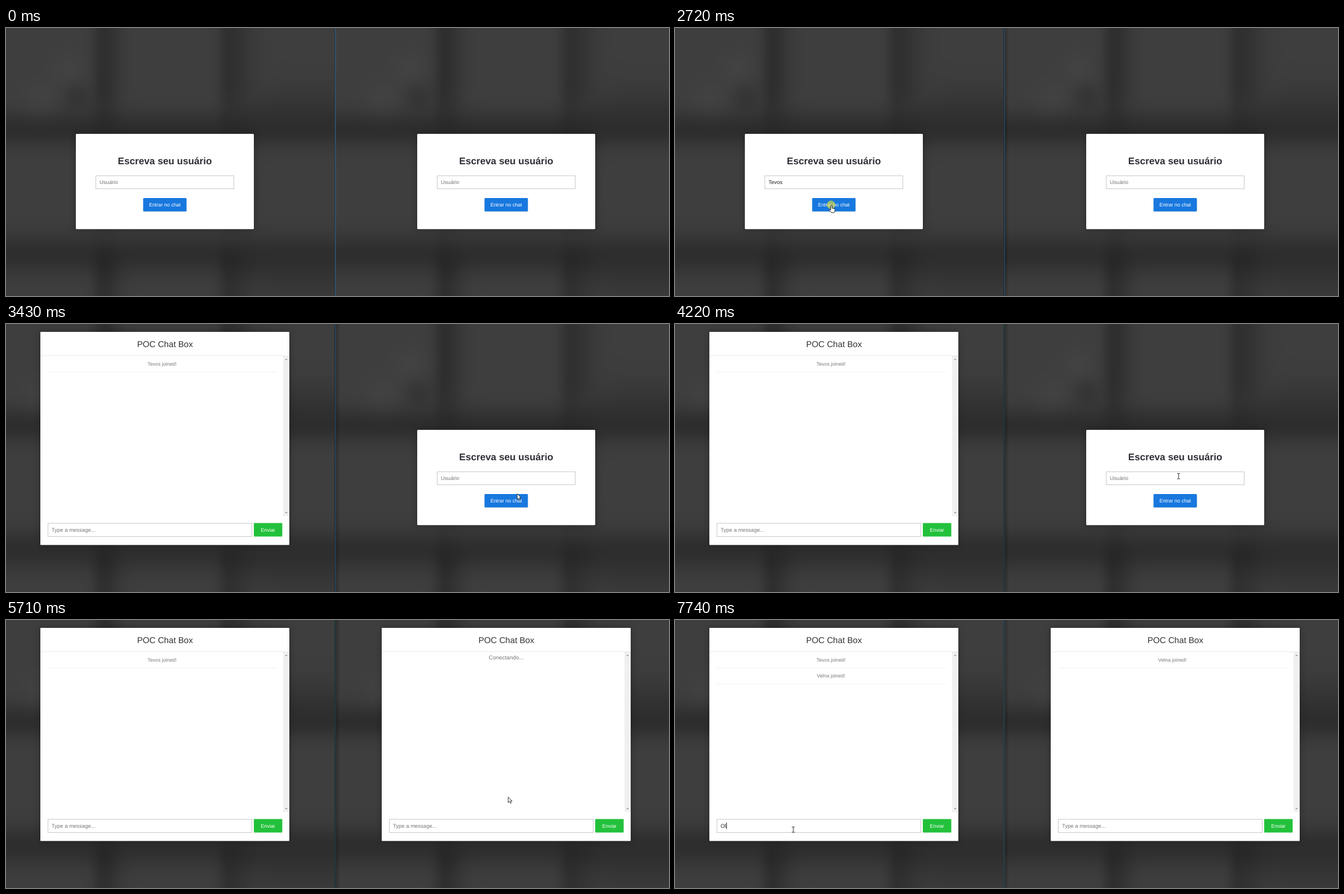
These frames come from a looping animation (1177 by 476 pixels, 8000 ms). An HTML page with a canvas:

```html
<!DOCTYPE html>
<html lang="pt">
<head>
<meta charset="utf-8">
<title>Chat</title>
<style>
  html, body { margin: 0; width: 100%; height: 100%; overflow: hidden; background: #3a3a3a; }
  canvas, svg { position: absolute; left: 0; top: 0; display: block; }
  text { font-family: "Liberation Sans", Arial, sans-serif; text-rendering: geometricPrecision; }
  .mid { text-anchor: middle; }
  .field { fill: #fff; stroke: #c8c8c8; }
  .box { fill: #fff; filter: drop-shadow(0 .6px 6px rgba(0,0,0,.3)); }
  .input { font-size: 9.5px; }
  .label { font-size: 8.95px; fill: #fff; }
  .note { font-size: 8.8px; fill: #777; }
  .caret { fill: #111; }
  .rule { fill: #f2f2f2; }
</style>
</head>
<body>
<canvas id="bg" width="1177" height="476"></canvas>
<svg id="stage" width="1177" height="476" viewBox="0 0 1177 476"></svg>
<script>
const W = 1177, H = 476, LOOP = 8000, SPLIT = 585, SHIFT = 606;
const START = 130, STEP = 78.35, BLINK = 500, PRESS = 80;
const USERS = ["Tevos", "Velna"];

const smooth = k => {
  k = Math.min(1, Math.max(0, k));
  return k * k * (3 - 2 * k);
};
const ramp = (v, a, b) => smooth((v - a) / (b - a));
const bell = (v, mid, low, high = low) => Math.exp(-(((v - mid) / (v < mid ? low : high)) ** 2));
const spot = (x, y, cx, cy, r) => bell(x, cx, r) * bell(y, cy, r);

// Blurred dark backdrop, the same in both windows
function shade(x, y) {
  const spread = 32 * ramp(x, 400, 500);
  const rows = (1 - 0.27 * bell(y, 180, 32 + spread, 30)) * (1 - 0.26 * bell(y, 402, 36, 34 + spread));
  const reach = 1 - 0.75 * ramp(y, 95, 200) + 0.7 * ramp(y, 375, 440);
  const columns = (1 - 0.25 * reach * bell(x, 172, 18, 30)) * (1 - 0.23 * reach * bell(x, 394, 17, 42));
  return 62 * rows * columns
    + 4 * spot(x, y, 110, 72, 28) - 9 * spot(x, y, 126, 122, 25) + 4 * spot(x, y, 62, 130, 32);
}

function paintBackdrop() {
  const ctx = document.getElementById("bg").getContext("2d");
  const img = ctx.createImageData(W, H);
  for (let y = 0, i = 0; y < H; y++) {
    for (let x = 0; x < W; x++, i += 4) {
      img.data.fill(shade(x < SPLIT ? x : x - SHIFT, y), i, i + 3);
      img.data[i + 3] = 255;
    }
  }
  ctx.putImageData(img, 0, 0);
}

const rect = (x, y, w, h, attrs) => `<rect x="${x}" y="${y}" width="${w}" height="${h}" ${attrs}/>`;
const label = (x, y, cls, words, attrs = "") => `<text x="${x}" y="${y}" class="${cls}" ${attrs}>${words}</text>`;

const note = (id, y, name) => `<g id="${id}">
  ${label(277, y, "note mid", name + " joined!")}
  ${rect(74, y + 10.7, 407, 1, 'class="rule"')}</g>`;

const login = n => `<g id="login${n}">
  ${rect(124, 188, 316, 169.3, 'rx="1.5" class="box"')}
  ${label(282, 242, "mid", "Escreva seu usuário", 'font-size="17.17" font-weight="bold" fill="#302e36"')}
  ${rect(159.5, 262.5, 245, 23, 'class="field"')}
  ${label(166, 277.3, "input", "", `id="user${n}"`)}
  ${rect(166, 268, 1, 11, `id="userCaret${n}" class="caret"`)}
  ${rect(243.5, 302.5, 77, 24, 'rx="1.5" fill="#000" opacity=".12"')}
  ${rect(243.5, 302, 77, 23.7, 'rx="1.5" fill="#1878df"')}
  ${label(282, 317, "label mid", "Entrar no chat")}</g>`;

const chat = n => `<g id="chat${n}">
  ${rect(61, 14, 442, 378.5, 'rx="1" class="box"')}
  ${label(282.3, 40.5, "mid", "POC Chat Box", 'font-size="15.1" fill="#333"')}
  ${rect(61, 56, 442, 1, 'fill="#e9e9e9"')}
  ${rect(492, 57, 11, 284, 'fill="#f0f0f0"')}
  <path d="M495 64l2.5-2.6 2.5 2.6zM495 334l2.5 2.6 2.5-2.6z" fill="#a0a0a0"/>
  ${n ? label(282, 69.5, "mid", "Conectando...", 'id="wait" font-size="9.95" fill="#777"') : ""}
  ${n ? note("own1", 73.8, USERS[1]) : note("own0", 73.8, USERS[0]) + note("guest", 102.3, USERS[1])}
  ${rect(74.5, 354, 362, 23.5, 'class="field"')}
  ${label(81, 369.3, "input", "", `id="msg${n}"`)}
  ${rect(81, 360, 1, 11, `id="msgCaret${n}" class="caret"`)}
  ${rect(440, 353.5, 50.5, 24, 'rx="1" fill="#23c13b"')}
  ${label(465.2, 368.8, "label mid", "Enviar")}</g>`;

const pane = n => `<g transform="translate(${n * SHIFT} 0)">${login(n)}${chat(n)}</g>`;

document.getElementById("stage").innerHTML = `
  <linearGradient id="fade"><stop stop-opacity=".25"/><stop offset="1" stop-opacity="0"/></linearGradient>
  ${rect(586, 0, 7, H, 'id="edge" fill="url(#fade)"')}
  ${rect(583, 0, 2, H, 'id="seamL"')}
  ${rect(584.5, 0, 1, H, 'id="seamR"')}
  ${pane(0)}${pane(1)}
  <g id="pointer">
    <circle id="press" r="7.5" fill="#f0e632" fill-opacity=".6"/>
    <path id="arrow" d="M.5 .3V10.2L2.8 8.2 4.4 11.6 6 10.9 4.5 7.5H7.4Z" fill="#fff" stroke="#222" stroke-width=".9"/>
    <path id="hand" transform="translate(.6 1.2)" fill="#fff" stroke="#111" stroke-width=".9" stroke-linejoin="round"
      d="M-1.2 1a1.2 1.2 0 0 1 2.4 0v3.8l4.2.9q1.4.4 1.2 1.8l-.6 2.8-.9 2.4h-5.2l-3.6-4.6q-.6-1.5 1-1.4l1.5 1.2z"/>
    <path id="beam" d="M-2.5-4.5H-.7L0-4 .7-4.5H2.5M0-4V4.5M-2.5 5H-.7L0 4.5 .7 5H2.5" fill="none" stroke="#222"/>
  </g>`;

const el = {};
document.querySelectorAll("[id]").forEach(e => el[e.id] = e);
const show = (id, on) => el[id].style.display = on ? "" : "none";

// Each click focuses a field or enters the chat
const CLICK = { user0: 810, enter0: 2720, user1: 3720, enter1: 5630, msg0: 6850 };
const opens = n => CLICK["enter" + n] + PRESS;

// What is typed, when it begins and the time per letter
const TYPING = {
  user0: { words: USERS[0], from: 1470, gap: 140 },
  user1: { words: USERS[1], from: 4370, gap: 117 },
  msg0: { words: "Ol", from: 7590, gap: 150 }
};

// Pointer moves: start, end, and the place reached
const ENTRY = [768, 440];
const MOVES = [
  [130, 680, 222, 272], [2170, 2323, 266, 294], [2402, 2558, 277, 314],
  [2800, 3342, 911, 311], [3342, 3590, 894, 270], [5160, 5470, 891, 314],
  [5930, 6400, 203, 380], [6480, 6720, 210, 372]
];

function pointerAt(t) {
  const q = START + STEP * Math.floor((t - START) / STEP);
  let [x, y] = ENTRY;
  for (const [a, b, toX, toY] of MOVES) {
    const k = ramp(q, a, b);
    x += (toX - x) * k;
    y += (toY - y) * k;
  }
  return [x, y];
}

function pointerShape(x, y, t) {
  const n = x < SPLIT ? 0 : 1, u = x - n * SHIFT;
  const over = (a, b, c, d) => u >= a && u <= c && y >= b && y <= d;
  if (t >= opens(n)) {
    return over(74, 353, 437, 378) ? "beam" : over(440, 353, 491, 378) ? "hand" : "arrow";
  }
  return over(159, 262, 405, 286) ? "beam" : over(243, 302, 321, 326) ? "hand" : "arrow";
}

function setField(kind, n, left, hint, t) {
  const id = kind + n, caret = kind + "Caret" + n;
  const { words, from, gap } = TYPING[id] || { words: "", from: LOOP, gap: 1 };
  const count = Math.min(words.length, Math.max(0, Math.floor((t - from) / gap) + 1));
  const typed = words.slice(0, count);
  el[id].textContent = typed || hint;
  el[id].setAttribute("fill", typed ? "#222" : "#757575");

  // The blink restarts with every key
  const last = count ? from + (count - 1) * gap : CLICK[id];
  const on = t >= last && Math.floor((t - last) / BLINK) % 2 === 0;
  show(caret, on);
  if (on) el[caret].setAttribute("x", Math.round(left + (typed ? el[id].getComputedTextLength() : 0)));
}

function setSeam(left, right) {
  el.seamL.setAttribute("fill", left);
  el.seamR.setAttribute("fill", right);
}

function render(t) {
  for (const n of [0, 1]) {
    const open = t >= opens(n);
    show("login" + n, !open);
    show("chat" + n, open);
    if (open) setField("msg", n, 81, "Type a message...", t);
    else setField("user", n, 166, "Usuário", t);
  }
  const joined = t >= opens(1) + PRESS;
  show("guest", joined);
  show("own1", joined);
  show("wait", !joined);

  show("edge", t >= CLICK.user0);
  if (t < CLICK.user0) setSeam("#2d3338", "#34699a");
  else if (t < CLICK.user1) setSeam("#292d30", "#1e5074");
  else if (t < CLICK.msg0) setSeam("#1d383d", "#292e30");
  else setSeam("#213a43", "#23424f");

  show("pointer", t >= START);
  const [x, y] = pointerAt(t), shape = pointerShape(x, y, t);
  el.pointer.setAttribute("transform", `translate(${x.toFixed(1)} ${y.toFixed(1)})`);
  for (const id of ["arrow", "hand", "beam"]) show(id, id === shape);
  show("press", Object.values(CLICK).some(c => t >= c && t < c + PRESS));
}

paintBackdrop();
const begin = performance.now();
function tick() {
  render((performance.now() - begin) % LOOP);
  requestAnimationFrame(tick);
}
tick();
</script>
</body>
</html>
```
